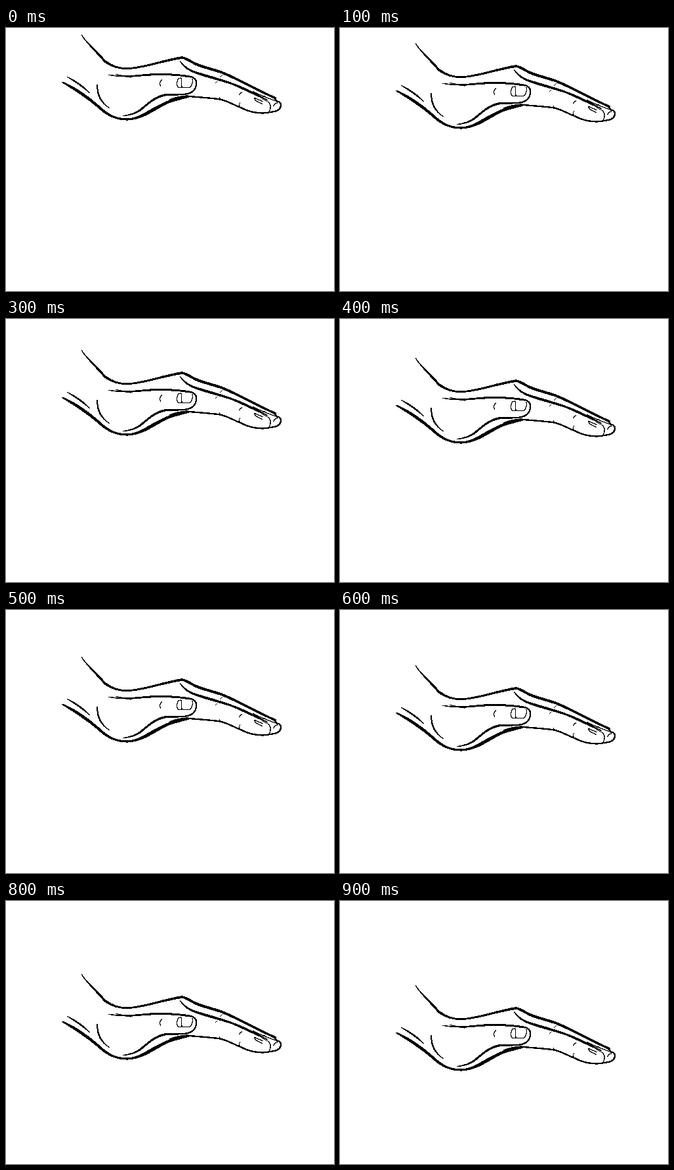
Animation, 500 px wide and 400 px high, one loop 1 s. Source, as an HTML page:

```html
<!DOCTYPE html>
<html lang="en">
<head>
<meta charset="utf-8">
<title>Lowering hand</title>
<style>
html, body { margin: 0; width: 100%; height: 100%; overflow: hidden; background: #fff; }
svg { display: block; width: 500px; height: 400px; }
.hand { animation: lower 1s step-end infinite; }
.hand path { stroke: #000; stroke-linecap: round; stroke-linejoin: round; shape-rendering: crispEdges; }
.brush { fill: #000; stroke-width: 1.2; }
.pen { fill: none; stroke-width: 1.3; }
.bold { fill: none; stroke-width: 2.4; }
@keyframes lower {
  0% { transform: translateY(0); }
  10% { transform: translateY(13px); }
  20% { transform: translateY(26px); }
  30% { transform: translateY(37px); }
  40% { transform: translateY(49px); }
  50% { transform: translateY(61px); }
  60% { transform: translateY(74px); }
  70% { transform: translateY(87px); }
  80% { transform: translateY(101px); }
  90%, 100% { transform: translateY(118px); }
}
</style>
</head>
<body>
<svg viewBox="0 0 500 400">
  <g class="hand">
    <!-- forearm, wrist and knuckle -->
    <path class="brush" d="M115 10C118 17 130 27 152 50C163 58 173 61 184 61C211 60 231 50 269 43.500L270 46C234 51.500 210 62 184 62.500C172 62.500 162 60 151 52.500C130 29 119 19 115 10Z"/>
    <path class="brush" d="M86 82C102 88 125 103 143 119.500C158 134 171 138 185 138C209 137 223 118 252 109.500C264 106 275 104.500 284 103.500C272 107.500 260 109.500 249 113.500C229 122 211 139 185 140C168 140 154 134 141 121.500C123 106 104 94 86 83Z"/>
    <path class="brush" d="M93 74C106 80 119 89 128 99C118 91 106 82 93 74Z"/>
    <path class="brush" d="M139 86C138 101 144 114 158 122C146 114 140 103 139 86Z"/>
    <path class="bold" d="M250 109C258 106 266 104 276 103.500"/>

    <!-- fingers -->
    <path class="brush" d="M268 43.500C280 46.500 284 52 295 55.500C308 60 319 62.500 331 67C358 78 384 94 412 106L411 108C383 96 358 81 329 69C317 65 303 61.500 292 57.500C282 53.500 277 48 268 46Z"/>
    <path class="brush" d="M265 50C271 58 279 64 292 67.500C312 73.500 329 78 345 84C365 91 382 100 399 110C381 103 365 94.500 345 86C328 80 309 76 292 70C278 65.500 270 59 265 50Z"/>
    <path class="pen" d="M376 96C388 103 398 106 411 111M389 106L395 103"/>
    <path class="bold" d="M276 103.500C292 105.500 309 106 327 108.500C340 112 349 118 359 121.500C371 128 388 131 400 128.500"/>
    <path class="pen" d="M398 129C404 127 405 117 400 112.500L391 108"/>
    <path class="bold" d="M410 108L413 111.500C419 112 421 118 417 123C413 127 407 128 400 128"/>
    <path class="pen" d="M408 119C409 115 411 114 414 114"/>
    <path class="pen" d="M379 106.500L392 112M379 107L380 110L391 116"/>
    <path class="pen" d="M326 75L330 71M319 84L322 81M356 102C357 99 358 98 360 98M357 113C355 116 355 119 358 121M325 105L327 109"/>

    <!-- thumb -->
    <path class="brush" d="M157 71.500C171 73 188 73.500 204 71.500C229 68.500 253 68.500 283 73.500L282 75C252 70 230 71 205 73C188 75 171 74 157 71.500Z"/>
    <path class="pen" d="M168 70.500L190 75"/>
    <path class="bold" d="M282 74C292 77 292 86 287 94C282 101 271 102 257 101"/>
    <path class="brush" d="M262 100.500C251 101.500 245 99.500 239 101.500C222 106 211 120 201 126C194 131 187 132 179 133.500C190 133 198 130 204 126.500C214 119 223 108 240 103.500C247 101.500 252 103.500 262 102.500Z"/>
    <path class="pen" d="M238 78C234 82 234 86 236 89"/>
    <path class="pen" d="M263 76.500C260 81 260 87 262 90C268 91 276 91 281 90C284 86 285 81 284 77M263 76.500L267 76C269 81 267 85 268 89.500"/>
  </g>
</svg>
</body>
</html>
```
